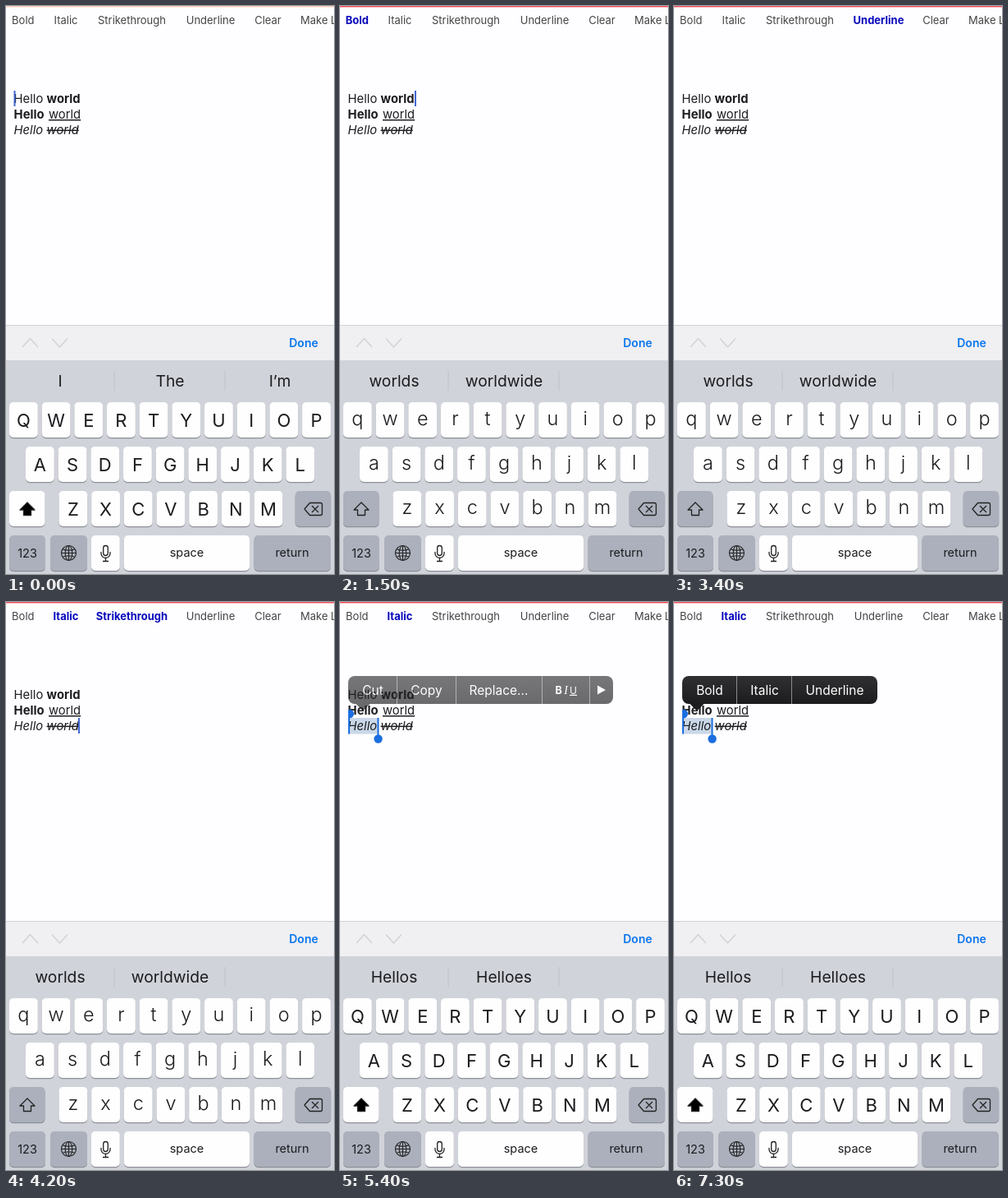
These frames come from a looping animation (400 by 691 pixels, 8 s). An HTML page:

```html
<!DOCTYPE html>
<html lang="en">
<head>
<meta charset="utf-8">
<title>Rich text editor</title>
<style>
  html, body { margin: 0; width: 100%; height: 100%; overflow: hidden; background: #fefdff; }
  svg { display: block; width: 100vw; height: 100vh; font-family: Inter, Roboto, sans-serif; }
  text { fill: #1c1c1f; white-space: pre; }
  .mid { text-anchor: middle; }
  .tool { font-size: 13px; fill: #444; }
  .tool.on { font-weight: 700; fill: #0808bd; }
  .body { font-size: 14.8px; }
  .bold { font-weight: 700; }
  .italic { font-style: italic; }
  .under { text-decoration: underline; }
  .strike { text-decoration: line-through; }
  .word { font-size: 19.3px; }
  .upper { font-size: 22px; }
  .lower { font-size: 23.5px; font-weight: 300; }
  .label { font-size: 14.5px; }
  .menu { font-size: 15.5px; fill: #fff; }
  .line { fill: none; stroke: #222; stroke-width: 1.3; stroke-linejoin: round; }
</style>
</head>
<body>
<svg viewBox="0 0 400 691">
  <defs>
    <linearGradient id="dark" x2="0" y2="1">
      <stop stop-color="#303032"/><stop offset="1" stop-color="#1c1c1e"/>
    </linearGradient>
    <clipPath id="page"><rect x="10" width="390" height="388"/></clipPath>
  </defs>
  <rect width="400" height="691" fill="#fefdff"/>
  <rect id="rule" width="400" height="1.4"/>
  <g id="tools"></g>

  <rect id="range" x="10" y="141" width="36.5" height="19.5" fill="#c9d7e8"/>
  <g class="body">
    <text x="9.6" y="118">Hello</text><text class="bold" x="49.6" y="118">world</text>
    <text class="bold" x="9.6" y="137">Hello</text><text class="under" x="52" y="137">world</text>
    <g class="italic">
      <text x="9.6" y="156">Hello</text><text class="strike" x="49.6" y="156">world</text>
    </g>
  </g>
  <rect id="caret" width="2" height="19" fill="#4068d2"/>
  <g id="handles" fill="#1b6ee0" clip-path="url(#page)">
    <rect x="10" y="138" width="2" height="22.5"/><circle cx="11.8" cy="136" r="5.2"/>
    <rect x="45.5" y="141" width="2" height="22"/><circle cx="46.6" cy="166.5" r="5.2"/>
  </g>
  <g id="styleMenu"></g>
  <g id="editMenu"></g>

  <rect y="388" width="400" height="43" fill="#f0eff2"/>
  <rect y="388" width="400" height="1" fill="#d0cfd3"/>
  <path d="M20 415l9.500-10.500 9.500 10.500M56 404.500l9.500 10.500 9.500-10.500" fill="none" stroke="#d2d2d6" stroke-width="1.5"/>
  <text class="mid" x="363" y="415.300" style="font-size:14px;font-weight:600;fill:#0a76ee">Done</text>
  <rect y="431" width="400" height="260" fill="#d1d3da"/>
  <path d="M132 444v24M267 444v24" stroke="#bfc2c9"/>
  <g id="words"></g>
  <g id="keys"></g>

  <path id="shift" class="line" d="M26 604l9 9h-4.500v6.500h-9v-6.500h-4.500z"/>
  <path class="line" d="M364 612l6.500-7.500h13q2 0 2 2v11q0 2-2 2h-13zM373 608l8 8M381 608l-8 8"/>
  <g class="line" transform="translate(76.500 665.500)" style="stroke-width:1.1">
    <circle r="9"/><ellipse rx="4.300" ry="9"/>
    <path d="M0-9V9M-9 0H9M-7.500-4.800q7.500 3 15 0M-7.500 4.800q7.500-3 15 0"/>
  </g>
  <g class="line">
    <rect x="118.700" y="656.500" width="5.600" height="12" rx="2.800"/>
    <path d="M116 664v2a5.500 5.500 0 0 0 11 0v-2M121.500 671.500v4M118 675.500h7"/>
  </g>
</svg>
<script>
const $ = id => document.getElementById(id);
const NS = 'http://www.w3.org/2000/svg';

function add(parent, tag, attrs, content = '') {
  const node = document.createElementNS(NS, tag);
  for (const name in attrs) node.setAttribute(name, attrs[name]);
  node.textContent = content;
  return parent.appendChild(node);
}
const label = (parent, cls, x, y, content) =>
  add(parent, 'text', { class: 'mid ' + cls, x, y }, content);

// Formatting toolbar
const tools = {};
[['Bold', 20.8], ['Italic', 73], ['Strikethrough', 153.5], ['Underline', 249.5], ['Clear', 319.5]]
  .forEach(([name, x]) => tools[name] = label($('tools'), 'tool', x, 22.3, name));
add($('tools'), 'text', { class: 'tool', x: 359, y: 22.3 }, 'Make Link');

// Suggestion bar
const words = {};
function suggest(name, list) {
  words[name] = add($('words'), 'g', { class: 'word' });
  return list.map((word, i) => label(words[name], '', 66 + 134 * i, 463.3, word));
}
suggest('start', ['I', 'The', 'I’m']);
suggest('world', ['worlds', 'worldwide']);
suggest('hello', ['Hellos', 'Helloes']);
const fading = suggest('fade', ['', '']);
[[['w', .35], ['orl', 1], ['d', .4], ['s', 1]],
 [['w', .35], ['orldwi', 1], ['d', .35], ['e', 1, -4], ['s', .22]]].forEach((parts, i) =>
  parts.forEach(([s, alpha, dx = 0]) => add(fading[i], 'tspan', { 'fill-opacity': alpha, dx }, s)));

// Keyboard
const WHITE = '#fefeff', GRAY = '#abb0bc';
const keys = $('keys');
function key(x, y, width, fill) {
  const box = { x, width, height: 43, rx: 5 };
  add(keys, 'rect', { ...box, y: y + 1.2, fill: '#8d9097' });
  return add(keys, 'rect', { ...box, y, fill });
}
const letters = [];
[['qwertyuiop', 4, 482], ['asdfghjkl', 24, 536], ['zxcvbnm', 64.5, 590]].forEach(([row, x0, y]) =>
  [...row].forEach((char, i) => {
    const x = x0 + 39.68 * i;
    key(x, y, 34.8, WHITE);
    letters.push({ char, y, node: label(keys, '', x + 17.4, y, char) });
  }));
const shiftKey = key(4, 590, 43.5, GRAY);
key(352.700, 590, 43.500, GRAY);
key(4, 644, 44, GRAY);
key(54, 644, 45, GRAY);
key(104, 644, 34.8, WHITE);
key(144, 644, 153, WHITE);
key(302.5, 644, 93.5, GRAY);
label(keys, 'label', 26, 670.800, '123');
label(keys, 'label', 220.5, 670, 'space');
label(keys, 'label', 349, 670, 'return');

function setCase(upper) {
  for (const { char, y, node } of letters) {
    node.textContent = upper ? char.toUpperCase() : char;
    node.setAttribute('class', 'mid ' + (upper ? 'upper' : 'lower'));
    node.setAttribute('y', y + (upper ? 29.7 : 28.3));
  }
  shiftKey.setAttribute('fill', upper ? WHITE : GRAY);
  $('shift').style.fill = upper ? '#000' : 'none';
}

// Pop-up menus
function menu(id, right, dividers, items) {
  const g = $(id);
  add(g, 'path', { d: 'M19 123.500h18l-7 7q-2 2-4 0z', fill: '#1c1c1e' });
  add(g, 'rect', { x: 10, y: 90, width: right - 10, height: 34, rx: 8, fill: 'url(#dark)' });
  if (id === 'editMenu') add(g, 'rect', { id: 'pressed', x: 246, y: 90, width: 58, height: 34, fill: '#6b6b6d' });
  dividers.forEach(x => add(g, 'rect', { x: x - .5, y: 90, width: 1, height: 34, fill: '#8b8b8d' }));
  items.forEach(([name, x]) => label(g, 'menu', x, 113, name));
  return g;
}
menu('styleMenu', 248, [76.5, 143.5], [['Bold', 43.5], ['Italic', 110.5], ['Underline', 196]]);
const edit = menu('editMenu', 333, [69.5, 141.5, 246.5, 304.5], [['Cut', 40], ['Copy', 105.5], ['Replace...', 193.5]]);
label(edit, 'menu bold', 266.700, 111.800, 'B').style.fontSize = '12.5px';
label(edit, 'menu italic', 275.5, 111.8, 'I').style.cssText = 'font-family:"Liberation Serif",serif;font-size:14px';
label(edit, 'menu under', 284.5, 111.8, 'U').style.fontSize = '12px';
add(edit, 'path', { d: 'M314 101.500l10 5.500-10 5.500z', fill: '#fff' });

// Each step changes only the listed parts of the state
const steps = [
  [0, { rule: '#f9cbb5', active: [], caret: [9.5, 103], caretAlpha: 1, words: 'start', upper: true,
        selected: false, edit: 0, style: 0, pressed: 0 }],
  [100, { rule: '#f6a295' }],
  [200, { rule: '#f27372' }],
  [300, { rule: '#ef4d55' }],
  [800, { caretAlpha: .4 }],
  [900, { caretAlpha: 0 }],
  [1200, { caret: [91, 103], caretAlpha: 1, active: ['Bold'], words: 'world', upper: false }],
  [1800, { caretAlpha: .4 }],
  [1900, { caretAlpha: 0 }],
  [2200, { caretAlpha: 1 }],
  [2400, { caret: [90, 122], active: ['Underline'] }],
  [3100, { caretAlpha: .4 }],
  [3200, { caretAlpha: 0 }],
  [3600, { caretAlpha: 1 }],
  [4100, { caret: [88, 141], active: ['Italic', 'Strikethrough'] }],
  [4800, { caretAlpha: .4 }],
  [5000, { caret: [44.7, 141], caretAlpha: 1, active: ['Italic'] }],
  [5100, { words: 'fade' }],
  [5200, { words: 'hello', upper: true }],
  [5300, { selected: true, caretAlpha: 0, edit: .25 }],
  [5400, { edit: .65 }],
  [5500, { edit: .95 }],
  [5600, { edit: 1 }],
  [6800, { pressed: 1 }],
  [7000, { style: 1, edit: .75 }],
  [7100, { edit: .45 }],
  [7200, { edit: .15 }],
  [7300, { edit: 0 }],
];

let shown = -1;
function render(time) {
  const index = steps.findLastIndex(([at]) => at <= time);
  if (index === shown) return;
  shown = index;
  const s = Object.assign({}, ...steps.slice(0, index + 1).map(step => step[1]));
  $('rule').setAttribute('fill', s.rule);
  for (const name in tools) tools[name].classList.toggle('on', s.active.includes(name));
  for (const name in words) words[name].style.display = name === s.words ? '' : 'none';
  setCase(s.upper);
  $('caret').setAttribute('x', s.caret[0]);
  $('caret').setAttribute('y', s.caret[1]);
  $('caret').style.opacity = s.caretAlpha;
  $('range').style.opacity = $('handles').style.opacity = +s.selected;
  $('editMenu').style.opacity = s.edit;
  $('styleMenu').style.opacity = s.style;
  $('pressed').style.opacity = s.pressed;
}

const start = performance.now();
function tick() {
  render((performance.now() - start) % 8000);
  requestAnimationFrame(tick);
}
tick();
</script>
</body>
</html>
```
